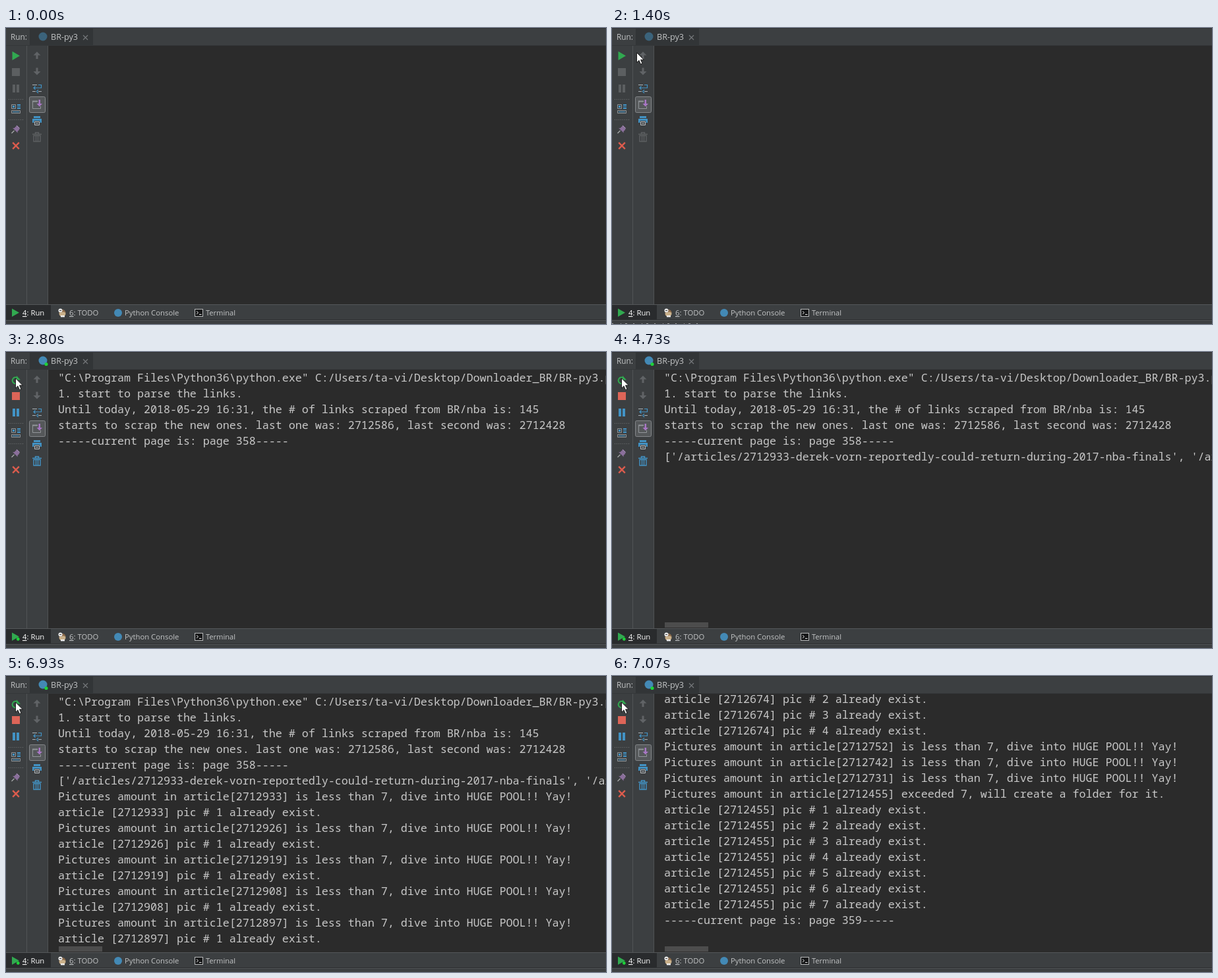
These frames come from a looping animation (910x450 px, 8 s). An HTML page:

```html
<!DOCTYPE html>
<html lang="en">
<head>
<meta charset="utf-8">
<title>Run console</title>
<style>
  html, body { margin: 0; width: 100%; height: 100%; overflow: hidden; background: #2b2b2b; }
  svg { display: block; }
  .ui { font: 11.3px "Open Sans", "Noto Sans", sans-serif; fill: #c3c5c6; }
  .log { font: 16.667px "Noto Sans Mono", "DejaVu Sans Mono", monospace; fill: #c8c8c8; white-space: pre; font-variant-ligatures: none; }
</style>
</head>
<body>
<svg width="910" height="450" viewBox="0 0 910 450">
  <defs>
    <clipPath id="pane"><rect x="64" y="27" width="846" height="393"/></clipPath>
    <path id="arrow" d="M0-5.5 5.5 0H1.5V5.5H-1.5V0H-5.5Z"/>
  </defs>

  <!-- panels -->
  <rect width="910" height="450" fill="#3c3f41"/>
  <rect width="910" height="1" fill="#2f3133"/>
  <rect x="36" y="1" width="96" height="25" fill="#323537"/>
  <rect y="26" width="910" height="1" fill="#343739"/>
  <rect x="64" y="27" width="846" height="393" fill="#2b2b2b"/>
  <path d="M31.5 27V420M63.5 27V420" stroke="#505355"/>
  <rect y="420" width="910" height="1" fill="#545759"/>
  <rect y="421" width="68" height="22" fill="#292b2d"/>
  <rect y="443" width="910" height="1" fill="#2c2e30"/>
  <rect y="444" width="910" height="1" fill="#505355"/>

  <!-- labels -->
  <g class="ui">
    <text x="7" y="18" font-size="11.8">Run:</text>
    <text x="68" y="18" font-size="12.6">BR-py3</text>
    <text x="25" y="437" fill="#fff"><tspan text-decoration="underline">4</tspan>: Run</text>
    <text x="96" y="437"><tspan text-decoration="underline">6</tspan>: TODO</text>
    <text x="180" y="437">Python Console</text>
    <text x="303" y="437" font-size="11.1">Terminal</text>
  </g>
  <path d="M117 11l7 7m0-7l-7 7" stroke="#74777a" stroke-width="1.2"/>
  <circle id="tabIcon" cx="56" cy="13" r="6.5" fill="#4389b5"/>
  <circle cx="170" cy="433" r="6" fill="#4389b5"/>

  <!-- left toolbar -->
  <path class="idle" d="M9.5 35.5V49L21 42.2Z" fill="#31a950"/>
  <g class="busy">
    <path d="M17.5 39.6A4.8 4.8 0 1 0 19 45" fill="none" stroke="#31a950" stroke-width="2"/>
    <path d="M16 36v6.5h6z" fill="#31a950"/>
  </g>
  <rect id="stop" x="9" y="61" width="12" height="12"/>
  <path id="pause" d="M10 86h4v12h-4zM16 86h4v12h-4z"/>
  <path d="M4 108.5H28M4 139.5H28" stroke="#707375" stroke-dasharray="1 2"/>
  <path d="M8.5 116.5h6v6h-6zM8.5 125.5h13v4h-13z" fill="none" stroke="#8f969b"/>
  <path d="M10 118h3v3h-3zM17 116h5v2h-5zM17 119h5v1h-5zM17 121h5v2h-5zM10 127h10v1h-10z" fill="#4293c5"/>
  <path d="M8.5 160l4-4" stroke="#a9abad" stroke-width="1.2"/>
  <path d="M10 152l2.5.3 3-3 5 5-3 3 .2 2.2z" fill="#8b6f9c"/>
  <path d="M16 148.5l4.5 4.5" stroke="#a98bbb" stroke-width="1.4"/>
  <path d="M10.2 174.2l9.6 9.6m0-9.6l-9.6 9.6" stroke="#db5c4d" stroke-width="2.4"/>

  <!-- right toolbar -->
  <g fill="#606366">
    <use href="#arrow" x="47" y="41.5"/>
    <use href="#arrow" transform="translate(47 66) rotate(180)"/>
  </g>
  <g fill="none">
    <path d="M40 86.5h7M40 96.5h5M49 96.5h5" stroke="#a9b0b5"/>
    <path d="M49 86.5h4.5v4.5H42m2.5-2.5L42 91l2.5 2.5M49 94l-2.5 2.5L49 99" stroke="#4293c5" stroke-width="1.2"/>
  </g>
  <rect x="35.5" y="104.5" width="24" height="24" rx="2" fill="#55585a" stroke="#84878a"/>
  <path d="M40.5 111.5h7M40.5 111v11.5h12V119" fill="none" stroke="#92969a"/>
  <path d="M40 110.5h8v2h-8z" fill="#92969a"/>
  <path d="M49.5 109h2.5v6h3l-4.2 4.5-4.3-4.5h3z" fill="#a877c4"/>
  <path d="M42 134h10v3H42zM40 138h14v6h-2.5v-3h-9v3H40z" fill="#4293c5"/>
  <path d="M43.5 142.5h7v5h-7zM45 145h4" fill="none" stroke="#b9bdc0"/>
  <g id="trash" fill="none" stroke-width="1.4">
    <path d="M40 161.5h14M44.5 161v-2h5v2"/>
    <path d="M42 163.5h10v9H42zM45.5 164v8M48.5 164v8"/>
  </g>

  <!-- bottom bar icons -->
  <path d="M9 426.5V439L20 432.7Z" fill="#31a950"/>
  <circle cx="85.5" cy="434" r="5" fill="#c9b08a"/>
  <path d="M80.5 433a5 5 0 0 1 10 0l-3-1.5z" fill="#8b6a4a"/>
  <path d="M83 437h6v2.5h-6z" fill="#eee"/>
  <circle cx="82.5" cy="429.5" r="3" fill="#e9e9e9"/>
  <path d="M81 429.5h3" stroke="#444"/>
  <rect x="286.5" y="427.5" width="12" height="11" fill="#161718" stroke="#b8babb"/>
  <path d="M289 430.5l2.5 2.3-2.5 2.3M293 435.5h3.5" fill="none" stroke="#e4e4e4"/>
  <g class="busy" fill="#1fd13a">
    <circle cx="61" cy="18.5" r="2.6"/>
    <circle cx="18.3" cy="436.5" r="2.4"/>
  </g>
  <path id="status" d="M0 449.5H136" stroke="#a0a2a3" stroke-dasharray="2 11 1 6 3 9"/>

  <!-- console -->
  <g clip-path="url(#pane)">
    <g id="log" class="log"></g>
    <rect id="scrollbar" x="80" y="411" width="66" height="8" fill="#a6a6a6" opacity=".28"/>
  </g>
  <path id="cursor" d="M.5.5V15.5L4 12.2 6.5 18 9 17 6.5 11.3H11.3Z" fill="#fff" stroke="#111" stroke-width=".9"/>
</svg>

<script>
const LOOP = 8000, PITCH = 24;
const byId = id => document.getElementById(id);
const show = (el, on) => { el.style.display = on ? '' : 'none'; };

const exists = (id, n) => `article [2712${id}] pic # ${n} already exist.`;
const small = id => `Pictures amount in article[2712${id}] is less than 7, dive into HUGE POOL!! Yay!`;
const article = ([id, hasPic]) => hasPic ? [small(id), exists(id, 1)] : [small(id)];
const series = (id, from, to) =>
  Array.from({ length: to - from + 1 }, (_, i) => exists(id, from + i));

const command = ['"C:\\Program Files\\Python36\\python.exe" C:/Users/ta-vi/Desktop/Downloader_BR/BR-py3.py'];
const parsed = [...command,
  '1. start to parse the links.',
  'Until today, 2018-05-29 16:31, the # of links scraped from BR/nba is: 145',
  'starts to scrap the new ones. last one was: 2712586, last second was: 2712428',
  '-----current page is: page 358-----'];
const listed = [...parsed,
  "['/articles/2712933-derek-vorn-reportedly-could-return-during-2017-nba-finals', '/articles/"];
const first = [...listed, ...article([933, 1])];
const filled = [...first, ...[[926, 1], [919, 1], [908, 1], [897, 1]].flatMap(article)];
const middle = [exists(882, 1),
  ...[[872, 1], [835, 1], [851, 1], [852], [845], [834, 1], [788], [818, 1], [816, 1], [774]].flatMap(article)];
const last = [...series(674, 2, 4), ...[752, 742, 731].map(small),
  'Pictures amount in article[2712455] exceeded 7, will create a folder for it.',
  ...series(455, 1, 7),
  '-----current page is: page 359-----'];

// Each row: start time, lines, baseline of the first line.
const screens = [
  [0, [], 45], [1930, command, 45], [2800, parsed, 45], [4730, listed, 45],
  [6330, first, 45], [6930, filled, 45], [7000, middle, 39], [7070, last, 41]
];

// Each row: start time, pointer x, pointer y.
const pointer = [
  [0, -50, -50], [70, 885, 434], [135, 690, 300], [200, 523, 193],
  [1330, 190, 88], [1400, 37, 37], [1470, 20, 40], [1530, 14, 39.5]
];

const at = (steps, t) => steps.findLast(step => step[0] <= t);
const toggles = [['.idle', false], ['.busy', true]].flatMap(([sel, on]) =>
  [...document.querySelectorAll(sel)].map(el => [el, on]));
let current;

function drawLog(screen) {
  if (screen === current) return;
  current = screen;
  const [, lines, top] = screen;
  byId('log').replaceChildren(...lines.map((line, i) => {
    const text = document.createElementNS('http://www.w3.org/2000/svg', 'text');
    text.setAttribute('x', 79);
    text.setAttribute('y', top + i * PITCH);
    text.textContent = line;
    return text;
  }));
}

function render(t) {
  const running = t >= 1730;
  drawLog(at(screens, t));
  toggles.forEach(([el, on]) => show(el, on === running));
  byId('stop').setAttribute('fill', running ? '#dd6558' : '#5c5f61');
  byId('pause').setAttribute('fill', running ? '#4293c5' : '#5c5f61');
  byId('trash').setAttribute('stroke', running ? '#4293c5' : '#5c5f61');
  byId('tabIcon').setAttribute('opacity', running ? 1 : 0.55);
  show(byId('status'), t >= 1330 && t < 1930);
  show(byId('scrollbar'), t >= 4730);
  const [, x, y] = at(pointer, t);
  byId('cursor').setAttribute('transform', `translate(${x} ${y})`);
}

const start = performance.now();
function tick() {
  render((performance.now() - start) % LOOP);
  requestAnimationFrame(tick);
}
tick();
</script>
</body>
</html>
```
